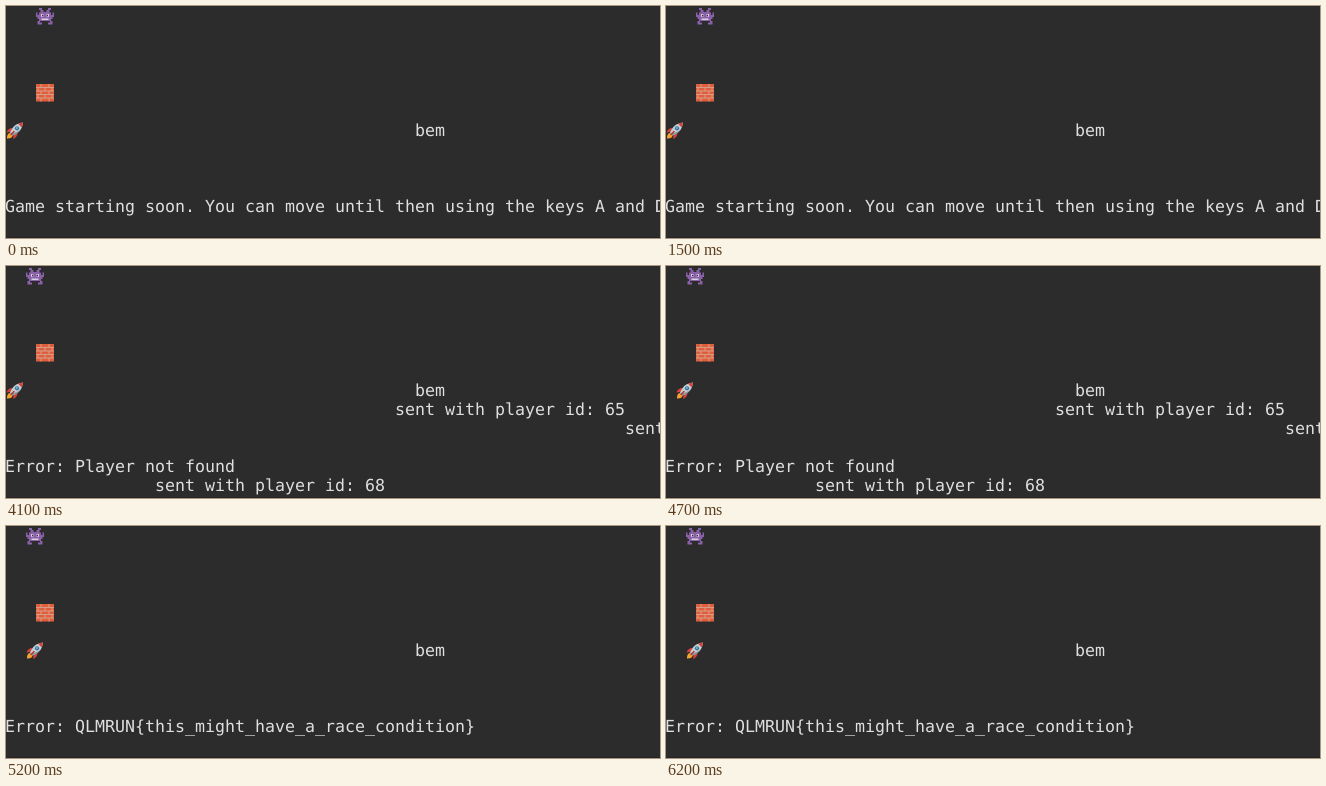
Recreate the animation shown at these times as an HTML page. Size 654 by 232 pixels, loop 7 s.

```html
<!DOCTYPE html>
<html lang="en">
<head>
<meta charset="utf-8">
<title>Terminal shooter</title>
<style>
  html, body { margin: 0; width: 100%; height: 100%; overflow: hidden; background: #2c2c2c; }
  svg { display: block; }
  text {
    font: 16.61px "DejaVu Sans Mono", monospace;
    fill: #dfdfdf;
    white-space: pre;
    text-rendering: geometricPrecision;
  }
</style>
</head>
<body>
<svg width="654" height="232" viewBox="0 0 654 232">
  <rect width="654" height="232" fill="#2c2c2c"/>
  <g id="sprites">
    <g id="alien">
      <path fill="#8a61a8" d="M3 0h3v2h1.5v2h3v-2H12V0h3v2h-1.5v2.5H15V7h1.5V4.5H18V9h-1.5v2H15v2h1.5v3.500H12v-2h2V13H4v1.500h2v2H1.500V13H3v-2H1.500V9H0V4.500h1.500V7H3V4.500h1.500V2H3z"/>
      <path fill="#d9cfe2" d="M5 6h2.500v2.800H5zM10.500 6H13v2.800h-2.500zM5.500 10.500h7V12h-7z"/>
      <path fill="#3a2b45" d="M6 6.800h1.300v1.500H6zM10.700 6.800H12v1.500h-1.300z"/>
    </g>
    <g id="brick" transform="translate(30 78)">
      <rect width="18" height="17.500" fill="#df5f3c"/>
      <path fill="none" stroke="#d9a48f" stroke-width=".9" d="M0 3.500h18M0 7h18M0 10.500h18M0 14h18M5 0v3.500M13 0v3.500M2 3.500V7M9 3.500V7M16 3.500V7M5 7v3.500M13 7v3.500M2 10.500V14M9 10.500V14M16 10.500V14M5 14v3.500M13 14v3.500"/>
    </g>
    <g id="rocket">
      <path fill="#f6a52c" d="M1 17C.8 13.500 2 11.500 4.500 11.500l2 2C6.500 16 4.500 17.200 1 17z"/>
      <path fill="#d8413a" d="M6.500 6.500C4 6.300 1.500 8 .5 11l4.500-.8zM11.500 11.500c.2 2.500-1.500 5-4.500 6l.8-4.500z"/>
      <path fill="#c5d0d5" d="M4 11.500C6 5.500 10 1.800 17 1c-.8 7-4.500 11-10.500 13z"/>
      <path fill="#d8413a" d="M12.300 2.500Q14.300 1.300 17 1q-.3 2.700-1.500 4.700z"/>
      <path fill="#80939d" d="M4 11.500L6.500 14q6-2 8.500-7-3 3.700-9 5.200z"/>
      <circle cx="11" cy="6.800" r="2.100" fill="#3c6f91"/>
      <circle cx="10.800" cy="6.600" r="1" fill="#73bddb"/>
      <path stroke="#b7322d" stroke-width="1.500" stroke-linecap="round" d="M5 13l3-3"/>
    </g>
  </g>
  <g id="lines"></g>
  <rect y="231" width="654" height="1" fill="#262324"/>
</svg>
<script>
const LOOP = 7000, CELL = 10, ROW = 19;
const $ = id => document.getElementById(id);
const sent = "sent with player id: ";
const player = [41, 6, "bem"];

// Each line is [column, row, text].
const screens = [
  { at: 0, lines: [player,
    [0, 10, "Game starting soon. You can move until then using the keys A and D"]] },
  { at: 4000, blank: true, lines: [
    [0, 10, "Game started. You can shoot using the key S"],
    [43, 11, sent + "0"]] },
  { at: 4100, lines: [player,
    [39, 7, sent + "65"],
    [62, 8, "sent"],
    [0, 10, "Error: Player not found"],
    [15, 11, sent + "68"],
    [38, 12, sent + "83"]] },
  { at: 5200, lines: [player,
    [0, 10, "Error: QLMRUN{this_might_have_a_race_condition}"]] }
];

function place(id, col, y) {
  $(id).setAttribute("transform", `translate(${col * CELL} ${y})`);
}

function textLine([col, row, str]) {
  const el = document.createElementNS("http://www.w3.org/2000/svg", "text");
  el.setAttribute("x", col * CELL - 1);
  el.setAttribute("y", row * ROW + 16);
  el.textContent = str;
  return el;
}

let shown = null;
function render(t) {
  const screen = screens.findLast(s => t >= s.at);
  if (screen !== shown) {
    shown = screen;
    $("lines").replaceChildren(...screen.lines.map(textLine));
    $("sprites").style.display = screen.blank ? "none" : "";
  }
  place("alien", t < 4100 ? 3 : 2, 2);
  place("rocket", t < 4700 ? 0 : t < 4900 ? 1 : 2, 115.5);
}

const start = performance.now();
function tick() {
  render((performance.now() - start) % LOOP);
  requestAnimationFrame(tick);
}
tick();
</script>
</body>
</html>
```
